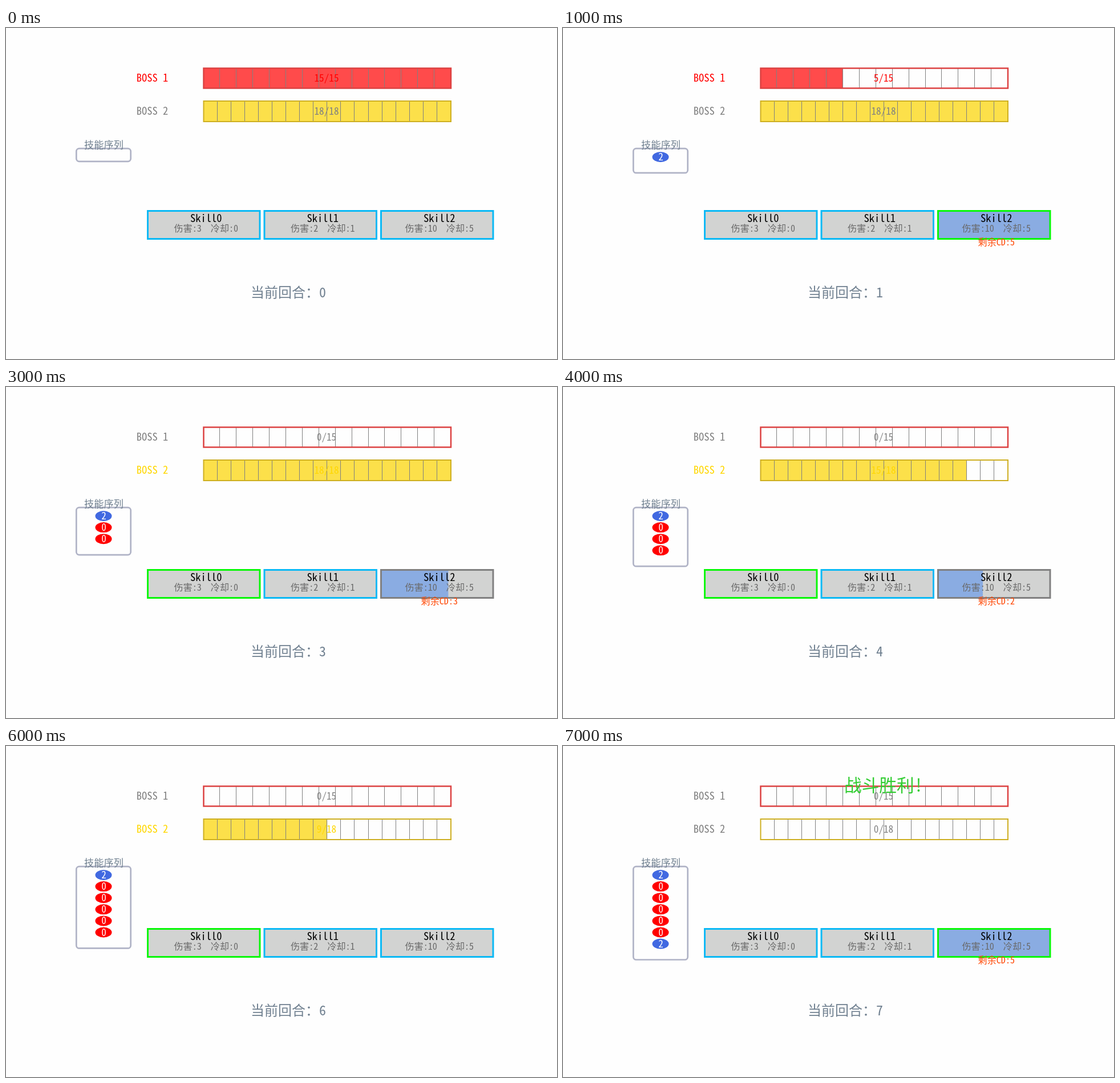
An HTML page with a canvas for the animation above (8000 ms loop, 966 by 580 pixels).

```html
<!DOCTYPE html>
<html lang="zh-CN">
<head>
<meta charset="utf-8">
<title>技能序列</title>
<style>
  html, body { margin: 0; width: 100%; height: 100%; overflow: hidden; background: #fefefe; }
  canvas { display: block; }
</style>
</head>
<body>
<canvas id="stage" width="966" height="580"></canvas>
<script>
const ctx = document.getElementById('stage').getContext('2d');
const FONT = '"Noto Sans Mono CJK SC", "Noto Sans CJK SC", "Noto Sans CJK", monospace';
const GRAY = '#808080', SLATE = '#708090';
const ROUND_MS = 1000;

const bosses = [
  { name: 'BOSS 1', max: 15, y: 70.5, h: 35, line: 2.5, fill: '#ff4b4b', edge: '#dc4141', active: '#ff0000' },
  { name: 'BOSS 2', max: 18, y: 128, h: 36, line: 2, fill: '#fce04a', edge: '#ceaf22', active: '#ffd700' },
];
const skills = [
  { damage: 3, cooldown: 0, color: '#ff0000' },
  { damage: 2, cooldown: 1, color: '#32cd32' },
  { damage: 10, cooldown: 5, color: '#4169e1' },
];
const casts = [2, 0, 0, 0, 0, 0, 2];

// Replays the fight up to the given round.
function fight(round) {
  const hp = bosses.map(b => b.max);
  const wait = skills.map(() => 0);
  const used = casts.slice(0, round);
  for (const id of used) {
    wait.forEach((w, i) => wait[i] = Math.max(0, w - 1));
    wait[id] = skills[id].cooldown;
    const target = hp.findIndex(h => h > 0);
    hp[target] = Math.max(0, hp[target] - skills[id].damage);
  }
  return { hp, wait, used, target: hp.findIndex(h => h > 0) };
}

function text(str, x, baseline, size, color) {
  ctx.font = `${size}px ${FONT}`;
  ctx.textAlign = 'center';
  ctx.fillStyle = color;
  ctx.fillText(str, x, baseline);
}

function box(x, y, w, h, edge, line) {
  ctx.strokeStyle = edge;
  ctx.lineWidth = line;
  ctx.strokeRect(x, y, w, h);
}

function drawBoss(boss, hp, isTarget) {
  const x = 346.5, w = 433.5, { y, h, max } = boss;
  const cell = w / max;
  const color = isTarget ? boss.active : GRAY;
  ctx.fillStyle = boss.fill;
  ctx.fillRect(x, y, cell * hp, h);
  ctx.fillStyle = GRAY;
  for (let i = 1; i < max; i++) ctx.fillRect(Math.floor(x + cell * i - 0.5), y, 1, h);
  box(x, y, w, h, boss.edge, boss.line);
  const middle = y + h / 2;
  text(boss.name, 256.5, middle + 5.5, 18.5, color);
  text(`${hp}/${max}`, 562, middle + 6.2, 17.2, color);
}

function drawQueue(used) {
  ctx.strokeStyle = '#b0b3c6';
  ctx.lineWidth = 2.7;
  ctx.beginPath();
  ctx.roundRect(123.3, 211.2, 95.4, 22.6 + 20.1 * used.length, 5);
  ctx.stroke();
  text('技能序列', 171.5, 211.3, 17.2, SLATE);
  used.forEach((id, i) => {
    const y = 226 + 20.1 * i;
    ctx.fillStyle = skills[id].color;
    ctx.beginPath();
    ctx.ellipse(171, y, 14.5, 9, 0, 0, 2 * Math.PI);
    ctx.fill();
    text(id, 171.5, y + 6, 17.2, '#fff');
  });
}

function drawSkill(skill, id, wait, isCast) {
  const x = 248.5 + 204.5 * id, y = 320.5, w = 196.5, h = 49;
  const center = x + 102.3;
  ctx.fillStyle = '#d2d3d2';
  ctx.fillRect(x, y, w, h);
  if (wait) {
    ctx.fillStyle = '#8aace2';
    ctx.fillRect(x, y, w * wait / skill.cooldown, h);
  }
  box(x, y, w, h, isCast ? '#08f808' : wait ? GRAY : '#0ab9f5', 3);
  text('Skill' + id, center, 340, 18.5, '#000');
  text(`伤害:${skill.damage}\u3000冷却:${skill.cooldown}`, center, 356.5, 16.1, '#696969');
  if (wait) text('剩余CD:' + wait, center, 381.3, 16.1, '#ff4500');
}

function draw(now) {
  const round = Math.floor(now / ROUND_MS) % (casts.length + 1);
  const { hp, wait, used, target } = fight(round);
  ctx.fillStyle = '#fefefe';
  ctx.fillRect(0, 0, 966, 580);
  bosses.forEach((b, i) => drawBoss(b, hp[i], i === target));
  drawQueue(used);
  skills.forEach((s, i) => drawSkill(s, i, wait[i], i === used[round - 1]));
  text('当前回合：' + round, 495, 472, 24, SLATE);
  if (target < 0) text('战斗胜利!', 562, 80, 30.7, '#32cd32');
}

const start = performance.now();
function tick() {
  draw(performance.now() - start);
  requestAnimationFrame(tick);
}
tick();
</script>
</body>
</html>
```
